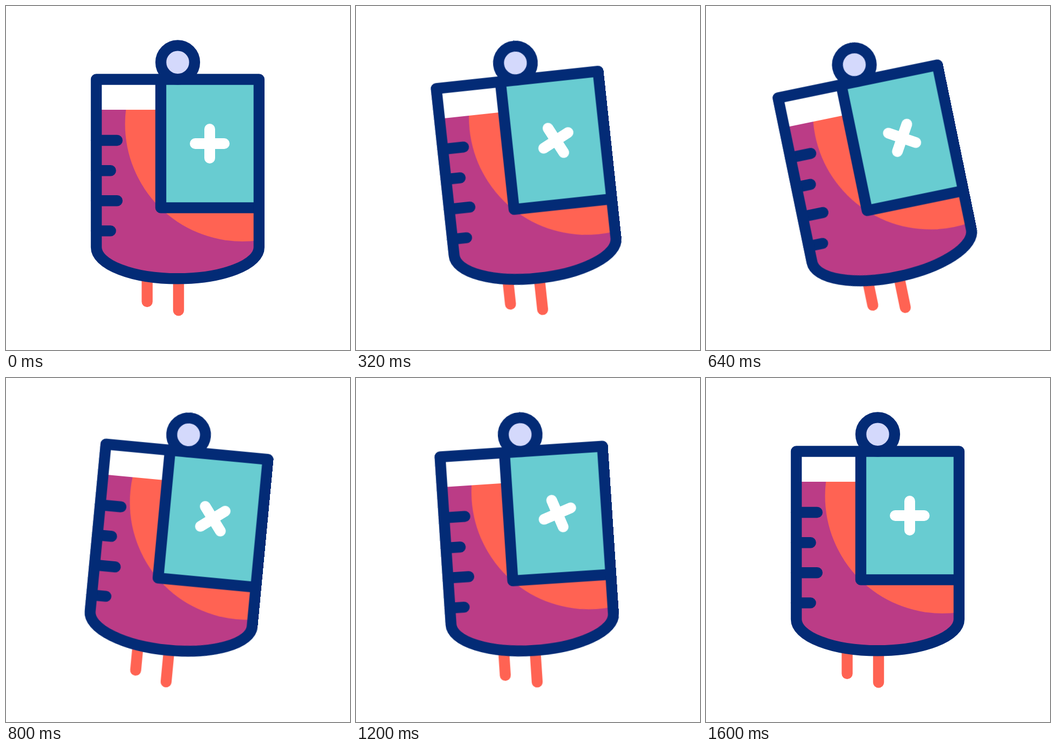
Animation, 640 px wide and 640 px high, one loop 2 s. Source, as an HTML page:

```html
<!DOCTYPE html>
<html lang="en">
<head>
<meta charset="utf-8">
<title>Swinging blood bag</title>
<style>
  html, body { margin: 0; width: 100%; height: 100%; overflow: hidden; background: #fff; }
  svg { display: block; width: 100%; height: 100%; }
  .line { fill: none; stroke: #032b76; stroke-width: 20.4; stroke-linecap: round; stroke-linejoin: round; }
  .tube { stroke: #ff6353; }
  .plus { stroke: #fff; stroke-width: 20; }
  #bag { transform-origin: 319.6px 320px; }
  #plus { transform-origin: 379px 256px; }
</style>
</head>
<body>
<svg viewBox="0 0 640 640">
  <defs>
    <clipPath id="fluid">
      <path d="M168 193H470.8V449A151.4 58.3 0 0 1 168 449Z"/>
    </clipPath>
  </defs>
  <g id="bag">
    <path class="line tube" d="M262.6 490V550M321 490V566.2"/>
    <path d="M168 136.5H470.8V449A151.4 58.3 0 0 1 168 449Z" fill="#fff"/>
    <g clip-path="url(#fluid)">
      <path d="M168 193H471V510H168Z" fill="#bb3c86"/>
      <circle cx="440" cy="219.5" r="218.5" fill="#ff6353"/>
    </g>
    <path d="M288 136.5H470.8V375.4H288Z" fill="#68ccd1"/>
    <circle class="line" cx="319.5" cy="104.8" r="31.4" style="fill:#d4d9fc"/>
    <path class="line" d="M288 136.5V375.4H470.8"/>
    <path class="line" d="M168 250H206.8M168 306.2H194.6M168 362.2H206.8M168 418.4H194.6"/>
    <path class="line" d="M168 136.5H470.8V449A151.4 58.3 0 0 1 168 449Z"/>
    <path id="plus" class="line plus" d="M352 256H406M379 229V283"/>
  </g>
</svg>
<script>
  const LOOP = 2000;
  const SWING = 'cubic-bezier(.55, 0, .45, 1)';
  const SETTLE = 'cubic-bezier(.33, 0, .4, 1)';

  // time in ms, bag angle, plus angle, easing towards the next step
  const steps = [
    [0, 0, 0, 'linear'],
    [130, 0, 0, SWING],
    [540, -14.4, -63, SWING],
    [900, 8, -33.5, SWING],
    [1220, -3.8, -19.5, SETTLE],
    [1600, 0, 0, 'linear'],
    [LOOP, 0, 0, 'linear']
  ];

  function turn(id, column) {
    const frames = steps.map(step => ({
      offset: step[0] / LOOP,
      transform: `rotate(${step[column]}deg)`,
      easing: step[3]
    }));
    document.getElementById(id).animate(frames, { duration: LOOP, iterations: Infinity });
  }

  turn('bag', 1);
  turn('plus', 2);
</script>
</body>
</html>
```
